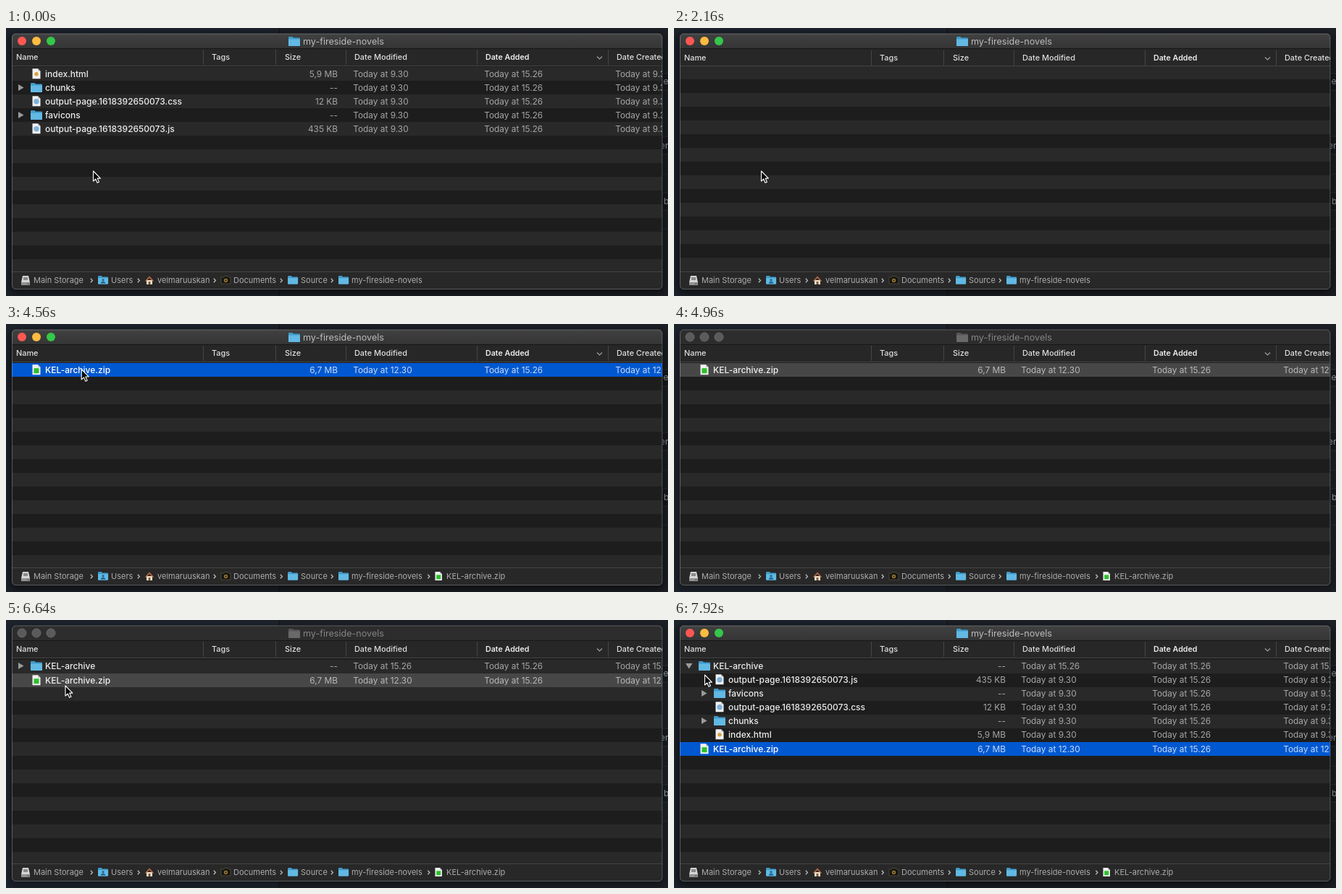
These frames come from a looping animation (914x371 px, 8000 ms). An HTML page:

```html
<!DOCTYPE html>
<html lang="en">
<head>
<meta charset="utf-8">
<title>File window</title>
<style>
  html, body { margin: 0; width: 100%; height: 100%; overflow: hidden; background: #1b1f26; }
  svg { display: block; width: 100vw; height: 100vh; }
  text { font-family: Inter, Roboto, "Liberation Sans", sans-serif; font-size: 11px; white-space: pre; }
  .head text { font-size: 10.9px; font-weight: 500; fill: #dedede; }
  .head .sorted { font-weight: 600; font-size: 10.7px; fill: #ececec; }
  .row text { font-size: 11.85px; fill: #a6a6a6; }
  .row .name { font-size: 12px; font-weight: 500; fill: #ececec; }
  .row .back { fill: none; }
  .row .tri { fill: #9b9b9b; }
  .row.alt .back { fill: #2a2a2a; }
  .row.blue .back { fill: #0058d1; }
  .row.blue text { fill: #c6dbf7; }
  .row.blue .name, .row.blue .tri { fill: #fff; }
  .row.grey .back { fill: #474747; }
  .row.grey text { fill: #b9b9b9; }
  .row.grey .name { fill: #f0f0f0; }
  .crumb text { fill: #acacac; }
  .behind text { font-size: 12px; fill: #a0a6ae; }
  .title { font-size: 12.6px; fill: #bcbcbc; }
  .idle .title { fill: #858585; }
  .idle .light { fill: #5b5b5b; stroke: #686868; }
  .idle .bar { fill: #2d2d2d; }
  .idle .badge { filter: grayscale(1) brightness(.62); }
  .shadow { filter: blur(7px); opacity: .6; }
  .idle .shadow { opacity: .38; }
</style>
</head>
<body>
<svg id="stage" viewBox="0 0 914 371" preserveAspectRatio="none"></svg>
<script>
const LOOP = 8000, STEP = 80, TOP = 54, ROW = 19;
const SITE = "my-fireside-novels", PACK = "KEL-archive";
const STAMP = "output-page.1618392650073";

const rect = (x, y, w, h, fill, extra = "") =>
  `<rect x="${x}" y="${y}" width="${w}" height="${h}" fill="${fill}" ${extra}/>`;
const path = (d, fill, extra = "") => `<path d="${d}" fill="${fill}" ${extra}/>`;
const text = (x, y, s, extra = "") => `<text x="${x}" y="${y}" ${extra}>${s}</text>`;
const at = (x, y, body, k = 1) => `<g transform="translate(${x} ${y}) scale(${k})">${body}</g>`;
const repeat = (n, f) => Array.from({ length: n }, (_, i) => f(i)).join("");

const folder = path("M0 1.2Q0 0 1.2 0H5.5L7 1.6H14.8Q16 1.6 16 2.8V12Q16 13 15 13H1Q0 13 0 12Z", "#3f9bc9")
  + path("M0 3.6H16V12Q16 13 15 13H1Q0 13 0 12Z", "#62b9e3");
const sheet = mark => path("M0 0H7.5L11 3.5V14H0Z", "#f1f1f1")
  + path("M7.5 0V3.5H11Z", "#c4c4c4") + mark;
const icons = {
  folder,
  page: sheet('<circle cx="5.5" cy="7.5" r="2.7" fill="#d6a63a"/>'),
  code: sheet('<circle cx="5.5" cy="7.5" r="3.7" fill="#7fb2dc"/>'),
  zip: sheet(rect(2, 5, 7, 7, "#2cc02c")),
  disk: path("M2 0H10L12 9V13H0V9Z", "#d5d5d5") + rect(0, 9, 12, 4, "#929292")
    + rect(3, 2, 6, 4, "#8a8a8a") + rect(8, 10.5, 2.5, 1, "#4c4c4c"),
  users: folder + '<circle cx="8" cy="6.6" r="1.9" fill="#23658c"/>'
    + path("M4.5 12Q4.5 8.8 8 8.8T11.5 12Z", "#23658c"),
  home: path("M2 6H10V12H2Z", "#eadfca") + path("M0 7L6 .5L12 7L11 8L6 3L1 8Z", "#b86a42")
    + rect(4.7, 8, 2.6, 4, "#7d5434"),
  docs: path("M0 2H4L5 .5H9L10 2H13V11H0Z", "#151515", 'stroke="#5e5236" stroke-width=".8"')
    + '<circle cx="6.5" cy="6.3" r="2.6" fill="#a58432"/><circle cx="6.5" cy="6.3" r="1.2" fill="#332a14"/>'
};

function row(id, name, icon, size, made, opts = {}) {
  const { indent = 0, tri = false, height = 18.4 } = opts;
  const mark = icon === "folder" ? at(34 + indent, 3, folder) : at(36.5 + indent, 2.2, icons[icon]);
  const arrow = tri ? `<path class="tri" d="M${17 + indent} 5L${24.5 + indent} 9.5L${17 + indent} 14Z"/>` : "";
  const cell = (x, s) => text(x, 13.7, "Today at " + s);
  return `<g class="row" id="${id}"><rect class="back" x="8" width="898" height="${height}"/>${arrow}${mark}`
    + text(54 + indent, 13.7, name, 'class="name"')
    + text(458, 13.7, size, 'text-anchor="end"')
    + cell(479.3, made) + cell(660.3, "15.26") + cell(841.3, made) + "</g>";
}

// The same five files, listed in two orders
const files = [
  ["index.html", "page", "5,9 MB"],
  ["chunks", "folder", "--"],
  [STAMP + ".css", "code", "12 KB"],
  ["favicons", "folder", "--"],
  [STAMP + ".js", "code", "435 KB"]
];
const fileRow = (id, [name, icon, size], indent) =>
  row(id, name, icon, size, "9.30", { indent, tri: icon === "folder" });

const heads = [[14, "Name"], [284, "Tags"], [385, "Size"], [481, "Date Modified"],
  [662, "Date Added", 'class="sorted"'], [843, "Date Created"]];
const header = heads.map(([x, s, c]) => text(x, 44.3, s, c)).join("")
  + [272, 372, 469, 650, 831].map(x => rect(x, 30, 1, 21, "#464646")).join("")
  + path("M816 39.5L819.5 43L823 39.5", "none", 'stroke="#a0a0a0" stroke-width="1.1"');

function crumb(x, icon, label, textX, first) {
  const k = icon === "folder" || icon === "users" ? .88 : icon === "zip" ? .86 : 1;
  const sep = first ? "" : path(`M${x - 10.2} 346.8L${x - 7.6} 349.5L${x - 10.2} 352.2`, "none",
    'stroke="#b8b8b8" stroke-width="1.3"');
  return sep + at(x, 343, icons[icon], k) + text(textX, 353, label);
}
const crumbs = crumb(21, "disk", "Main Storage", 38, true) + crumb(127, "users", "Users", 145)
  + crumb(192, "home", "velmaruuskan", 209) + crumb(297, "docs", "Documents", 314)
  + crumb(389, "folder", "Source", 407) + crumb(459, "folder", SITE, 477);

const behind = rect(0, 0, 914, 371, "#1d2026") + rect(0, 0, 377, 371, "#1e242d")
  + rect(376.5, 0, 1, 371, "#11141a")
  + [[63, 23], [150, 25], [228, 24]].map(([y, h]) =>
      rect(890, y, 40, h, "#181b20", 'stroke="#30353d"')).join("")
  + rect(900, 202, 14, 1, "#292e35") + rect(900, 278, 14, 1, "#292e35");
const letters = text(907.5, 78, "e") + text(903, 166.5, "er") + text(908, 244, "b");

const lights = ["#fc5753", "#fdbc40", "#34c749"].map((c, i) =>
  `<circle class="light" cx="${22 + 20 * i}" cy="18" r="6" fill="${c}"/>`).join("");

document.getElementById("stage").innerHTML = `
<defs>
  <linearGradient id="sheen" x2="0" y2="1"><stop stop-color="#414141"/><stop offset="1" stop-color="#353535"/></linearGradient>
  <clipPath id="frame"><rect x="8" y="8" width="898" height="353.5" rx="5"/></clipPath>
  <clipPath id="body"><rect x="8" y="52.5" width="898" height="285"/></clipPath>
  <clipPath id="below"><rect x="8" y="${TOP + ROW}" width="898" height="265"/></clipPath>
</defs>
<g class="behind">${behind}${letters}</g>
<g id="win">
  <rect class="shadow" x="5" y="10" width="904" height="358" rx="6"/>
  <g clip-path="url(#frame)">
    ${rect(8, 8, 898, 354, "#212121")}
    <rect class="bar" x="8" y="8" width="898" height="20" fill="url(#sheen)"/>
    ${lights}
    <g class="badge">${at(390, 12, folder)}</g>
    ${text(410, 22.6, SITE, 'class="title"')}
    <g clip-path="url(#body)">
      <g id="stripes">${repeat(17, i => rect(8, TOP + ROW * (i - 1), 898, ROW, i % 2 ? "#292929" : "#1d1d1d"))}</g>
      <g id="start">${files.map((f, i) => fileRow("old" + i, f, 0)).join("")}</g>
      <g id="kids" clip-path="url(#below)">${[4, 3, 2, 1, 0].map((n, i) => fileRow("kid" + i, files[n], 21)).join("")}</g>
      ${row("pack", PACK, "folder", "--", "15.26", { tri: true })}
      ${row("zip", PACK + ".zip", "zip", "6,7 MB", "12.30", { height: ROW })}
    </g>
    ${rect(8, 28, 898, 1, "#171717")}${rect(8, 29, 898, 23, "#272727")}${rect(8, 52, 898, 1, "#444")}
    <g class="head" id="head">${header}</g>
    ${rect(8, 337, 898, 25, "#282828")}${rect(8, 337, 898, 1, "#454545")}
    <g class="crumb">${crumbs}<g id="last">${crumb(592.5, "zip", PACK + ".zip", 608)}</g></g>
  </g>
  <rect x="8.5" y="8" width="897.5" height="353.5" rx="5" fill="none" stroke="#fff" stroke-opacity=".26"/>
</g>
<path id="cursor" d="M.5 .5V14.6L3.8 11.5L6 16.8L8.4 15.8L6.2 10.6H10.4Z" fill="#050505" stroke="#fff" stroke-width="1.1" stroke-linejoin="round"/>`;

const $ = id => document.getElementById(id);
const el = Object.fromEntries(["win", "stripes", "start", "kids", "pack", "zip", "head", "last", "cursor"].map(id => [id, $(id)]));
const olds = files.map((_, i) => $("old" + i)), kids = files.map((_, i) => $("kid" + i));
const arrow = el.pack.querySelector(".tri"), shut = arrow.getAttribute("d");

const part = (t, a, b) => Math.min(1, Math.max(0, (t - a) / (b - a)));
const easeOut = p => 1 - (1 - p) ** 2;
const smooth = p => p * p * (3 - 2 * p);
const move = (node, x, y) => node.setAttribute("transform", `translate(${x.toFixed(2)} ${y.toFixed(2)})`);
const show = (node, on) => node.setAttribute("display", on ? "inline" : "none");
const style = (node, name) => node.setAttribute("class", "row " + name);

// time, x, y of the pointer tip
const trail = [[0, 120, 197.5], [3920, 120, 197.5], [4320, 117, 92], [4480, 104, 62], [5680, 81.5, 90.5],
  [6640, 81.5, 90.5], [7200, 19, 60], [7600, 19, 60], [7920, 42, 75.5], [LOOP, 42, 75.5]];
function pointer(t) {
  const i = trail.findIndex(k => k[0] > t);
  const [a, x, y] = trail[i - 1], [b, u, v] = trail[i];
  const p = smooth(part(t, a, b));
  return [x + (u - x) * p, y + (v - y) * p];
}

function draw(t) {
  const idle = t >= 4800 && t < 7440;
  const empty = t >= 1920 && t < 3520;
  const gone = part(t, 1600, 1920), land = easeOut(part(t, 3560, 3840));
  const unpack = easeOut(part(t, 5920, 6240)), open = easeOut(part(t, 7360, 7680));
  const flat = (t >= 3520 && t < 3840) || (t >= 5920 && t < 6240);
  const nudge = empty ? -2 : unpack;

  el.win.setAttribute("class", idle ? "idle" : "");
  show(el.stripes, !flat);
  move(el.stripes, 0, nudge);
  move(el.head, 0, empty ? 1 : 0);

  show(el.start, gone < 1);
  el.start.setAttribute("opacity", 1 - gone);
  olds.forEach((r, i) => {
    style(r, t >= 720 ? "blue" : "");
    move(r, 0, TOP + ROW * i - 5 * ROW * smooth(gone));
  });

  const picked = t >= 4480;
  show(el.zip, t >= 3560);
  style(el.zip, picked ? (idle ? "grey" : "blue") : flat ? "alt" : "");
  move(el.zip, 0, TOP + ROW * (land - 1 + unpack + 5 * open) + unpack);
  show(el.last, picked);

  show(el.pack, unpack > 0);
  el.pack.setAttribute("opacity", unpack);
  style(el.pack, flat ? "alt" : "");
  move(el.pack, 0, TOP - ROW * (1 - unpack));
  arrow.setAttribute("d", open > 0 ? "M16 6H25.5L20.7 13.5Z" : shut);

  show(el.kids, open > 0);
  kids.forEach((r, i) => move(r, 0, TOP + ROW * (i + 1 - 5 * (1 - open))));

  show(el.cursor, t < 4800 || t >= 5680);
  move(el.cursor, ...pointer(t));
}

let begin;
function tick(now) {
  begin ??= now;
  const t = (now - begin) % LOOP;
  draw(Math.floor(t / STEP) * STEP);
  requestAnimationFrame(tick);
}
draw(0);
requestAnimationFrame(tick);
</script>
</body>
</html>
```
